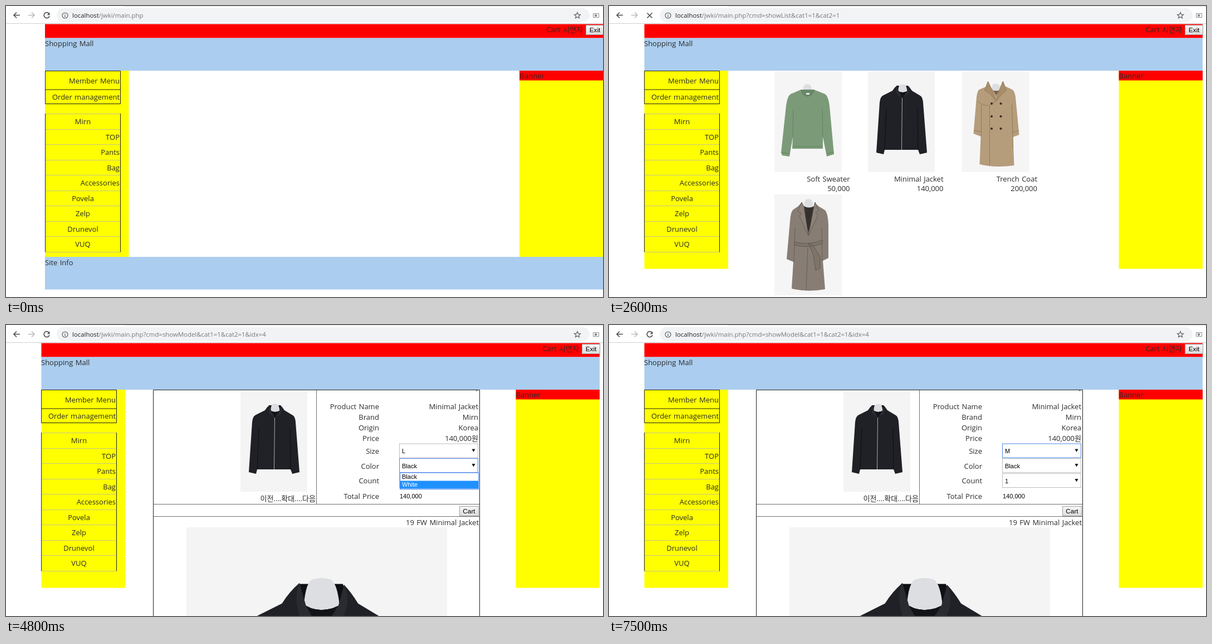
Write an HTML page that moves like this. It is 1072x522 px and loops after 8 s.

```html
<!DOCTYPE html>
<html lang="en">
<head>
<meta charset="utf-8">
<title>Shopping Mall</title>
<style>
html, body { margin: 0; width: 100%; height: 100%; overflow: hidden; background: #fff; }
svg { display: block; width: 1072px; height: 522px; }
text { font: 13px "Open Sans", "Noto Sans CJK KR", "Noto Sans CJK", sans-serif; word-spacing: 1px; fill: #2b2b2b; }
.ui { font: 11px "Liberation Sans", Arial, sans-serif; word-spacing: 0; fill: #000; }
.btn { font-size: 11.8px; }
.url { font-size: 11.4px; word-spacing: 0; fill: #75787c; }
</style>
</head>
<body>
<svg viewBox="0 0 1072 522">
  <defs>
    <linearGradient id="face" x2="0" y2="1"><stop stop-color="#f8f8f8"/><stop offset="1" stop-color="#dcdcdc"/></linearGradient>
    <pattern id="tweed" width="3" height="3" patternUnits="userSpaceOnUse">
      <rect width="3" height="3" fill="#91877c"/><path d="M0 0H1.5V1.5H3V3H1.5V1.5H0Z" fill="#7d746b"/>
    </pattern>
    <g id="neck"><path d="M54 36Q55 25 58 24Q62 22.500 66.500 24Q69.500 26 70.500 36Q62 40 54 36Z" fill="#dcdee1"/></g>
    <g id="jacket">
      <rect width="120" height="181" fill="#f5f4f5"/>
      <path d="M52 26L72 26L76 36L62 50L48 36Z" fill="#0e0f12"/>
      <use href="#neck"/>
      <path d="M52 25.600Q47 30 44 35L27 43.500Q22 46 21 56L15 146L28 149L30 141H90L93 149L106 146L99 56Q98 46 94 44L79 35Q76 30 72.600 26.400L70 36Q62 40 55 36Z" fill="#1f2126"/>
      <path d="M55 36Q62 40 70 36L62 48Z" fill="#121317"/>
      <path d="M52 25.600Q49 33 52.500 42L61 47L55 36ZM72.600 26.400Q76 33 72 42L63 47L70 36Z" fill="#292b30"/>
      <path d="M30 141L33 68M90 141L89 68" stroke="#0c0d10" fill="none"/>
      <path d="M61.500 48L60.500 141" stroke="#b9bbbf" stroke-width=".9"/>
    </g>
    <g id="sweater">
      <rect width="121" height="181" fill="#f6f5f6"/>
      <use href="#neck" x="-3"/>
      <path d="M48 33L29 41Q23 45 21 62L12 146L14 151L27 153L33 118L32 139H87L87 118L94 153L107 149L99 62Q97 45 91 41L71 33Q60 40 48 33Z" fill="#7b9b78"/>
      <path d="M48 33Q50 44 60 45Q69 44 71 33" fill="#69886a" stroke="#5d7b5e"/>
      <path d="M33 118L34 68M87 118L86 68M33 135H86M13 146L27 148M94 148L107 145" fill="none" stroke="#64835f"/>
      <path d="M57 39H63V42H57Z" fill="#e5e9e2"/>
    </g>
    <g id="trench">
      <rect width="121" height="181" fill="#f6f5f6"/>
      <use href="#neck" x="-1" y="-1"/>
      <path d="M47 18L43 28L31 33Q27 36 26 52L21 112L34 117L32 167Q60 174 94 169L92 118L103 114L97 52Q96 36 91 33L78 27L73 18L70 30L62 44L53 30Z" fill="#b59c7b"/>
      <path d="M53 30L62 44L70 30L66 35H57Z" fill="#7c6549"/>
      <path d="M47 18L41 34L51 41L61 53L52 29ZM74 18L80 34L71 42L62 53L69 29Z" fill="#a88e6b" stroke="#896f4f" stroke-width=".7"/>
      <path d="M62 53L50 62V169M35 60V117M90 60L92 137M22 106L35 109M91 110L102 106M28 54Q40 63 49 61" fill="none" stroke="#8f7654" stroke-width=".9"/>
      <path d="M53.500 58h.1M70 58h.1M53.500 81h.1M70 81h.1M53.500 103h.1M70 103h.1" stroke="#3c2e20" stroke-width="4" stroke-linecap="round"/>
    </g>
    <g id="coat">
      <rect width="121" height="181" fill="#f6f5f6"/>
      <use href="#neck" x="-1" y="-15"/>
      <path d="M49 14L43 21L34 27Q29 31 28 48L22 116L34 121L31 169Q60 176 91 170L87 119L97 114L97 55Q96 30 89 27L79 21L72 14L71 22Q62 26 53 22Z" fill="url(#tweed)"/>
      <path d="M53 21Q62 26 71 21L70 42L61 68L55 45Z" fill="#34302d"/>
      <path d="M49 14L42 30L49 34L45 39L61 74L53 22ZM73 14L79 29L74 33L78 38L61 74L70 27Z" fill="#8d8278" stroke="#5e564e" stroke-width=".8"/>
      <path d="M36 85Q60 92 86 82V88Q62 97 36 91ZM61 88L69 91L82 112L82 132L74 136L70 108Z" fill="#7e746a" stroke="#595149" stroke-width=".8"/>
      <path d="M35 121L37 60M86 119L85 60M60 95L57 172" fill="none" stroke="#675e55"/>
    </g>
  </defs>
  <g id="stage"></g>
</svg>
<script>
const LOOP = 8000, BLUE = '#4a86e8';
const stage = document.getElementById('stage');

const rect = (x, y, w, h, fill, extra = '') =>
  `<rect x="${x}" y="${y}" width="${w}" height="${h}" fill="${fill}" ${extra}/>`;
const text = (x, y, s, anchor = 'end', cls = '', extra = '') =>
  `<text x="${x}" y="${y}" text-anchor="${anchor}" class="${cls}" ${extra}>${s}</text>`;
const line = (d, color = '#222', extra = '') =>
  `<path d="${d}" fill="none" stroke="${color}" ${extra}/>`;
const image = (id, x, y, scale = 1) =>
  `<use href="#${id}" transform="translate(${x} ${y}) scale(${scale})"/>`;
const shift = (dx, s) => `<g transform="translate(${dx})">${s}</g>`;
const button = (x, y, w, label) =>
  rect(x + .5, y + .5, w, 17, 'url(#face)', 'stroke="#a3a3a3"') +
  text(x + w / 2 + .5, y + 13, label, 'middle', 'ui btn');

function toolbar(query, loading) {
  const reload = line('M77.200 13.600A5 5 0 1 0 78 18', '#4a4d51', 'stroke-width="1.600"') +
    '<path d="M78.500 11.500V16.300H73.700Z" fill="#4a4d51"/>';
  const stop = line('M68.500 12.500L77.500 21.500M77.500 12.500L68.500 21.500', '#4a4d51', 'stroke-width="1.600"');
  return rect(0, 0, 1072, 32, '#fff') + rect(213, 0, 859, 1, '#dee1e6') +
    rect(91, 4, 957, 25, '#f1f3f4', 'rx="12.500"') +
    line('M0 31.500H1072', '#cfd1d4') +
    line('M25 16.500H14M19 11.500L14 16.500L19 21.500', '#4a4d51', 'stroke-width="1.600"') +
    line('M40 16.500H51M46 11.500L51 16.500L46 21.500', '#b9bbbe', 'stroke-width="1.600"') +
    (loading ? stop : reload) +
    '<circle cx="106" cy="17" r="5" fill="none" stroke="#5f6368" stroke-width="1.200"/>' +
    line('M106 13.800V15M106 16.200V20', '#5f6368', 'stroke-width="1.300"') +
    text(119, 21, `<tspan fill="#202124">localhost</tspan>/jwki/main.php${query}`, 'start', 'url') +
    line('M1026 11.500L1027.600 15.200L1031.500 15.500L1028.500 18L1029.500 21.800L1026 19.700L1022.500 21.800L1023.500 18L1020.500 15.500L1024.400 15.200Z', '#5f6368', 'stroke-width="1.200"') +
    line('M1054.500 13.500H1064.500V20.500H1054.500Z', '#8a8d91') +
    rect(1057, 15, 4, 4, '#8a8d91');
}

const brands = ['Mirn', 'TOP', 'Pants', 'Bag', 'Accessories', 'Povela', 'Zelp', 'Drunevol', 'VUQ'];

function layout(tall) {
  const bottom = tall ? 471.5 : 450;
  const blocks = rect(70, 32.5, 1002.5, 25, '#f00') + rect(70, 57.5, 1002.5, 58.5, '#abcdef') +
    rect(70, 116, 150.500, bottom - 116, '#ff0') + rect(922, 116, 150.5, bottom - 116, '#ff0') +
    rect(922, 116, 150.5, 17.5, '#f00') +
    (tall ? '' : rect(70, 450, 1002.5, 58.5, '#abcdef'));
  const rowY = i => Math.round(193 + i * 27.55) + .5;
  const menu = brands.map((name, i) => {
    const side = i > 0 && i < 5;
    return text(side ? 204 : 138, rowY(i) + 18.5, name, side ? 'end' : 'middle');
  }).join('');
  const rules = Array.from({ length: 10 }, (_, i) => `M71 ${rowY(i)}H205`).join('');
  const labels = line('M70.500 116.500H205.500V175.500H70.500ZM70.500 150H205.500') +
    line(rules, '#c6c68c') + line('M70.500 193V441.500M205.500 193V441.500') + menu +
    text(204, 138.500, 'Member Menu') + text(204, 168, 'Order management') +
    text(70, 72, 'Shopping Mall', 'start') + text(922.5, 130, 'Banner', 'start') +
    text(1036, 46.5, 'Cart 시연자') + button(1041, 34, 32, 'Exit') +
    (tall ? '' : text(70, 464.5, 'Site Info', 'start'));
  return shift(tall ? -6.5 : 0, blocks) + shift(tall ? -7 : 0, labels);
}

function products() {
  const item = (id, x, name, price) => image(id, x, 117) +
    text(x + 135.5, 315, name) + text(x + 135.5, 332, price);
  return item('sweater', 297, 'Soft Sweater', '50,000') +
    item('jacket', 465, 'Minimal Jacket', '140,000') +
    item('trench', 633.5, 'Trench Coat', '200,000') + image('coat', 297, 338);
}

function select(y, value, focused) {
  return rect(713.5, y, 141, 25, '#fff', `stroke="${focused ? BLUE : '#bdbdbd'}"`) +
    text(718, y + 17, value, 'start', 'ui') +
    `<path d="M843.500 ${y + 9.500}H849.500L846.500 ${y + 15}Z" fill="#111"/>`;
}

function options(y, names, hover) {
  return rect(714.5, y, 141, names.length * 14 + 1.5, '#fff', `stroke="${BLUE}"`) +
    names.map((name, i) => {
      const top = y + .5 + i * 14, on = i === hover;
      return (on ? rect(715, top, 140, 14, '#1e90ff') : '') +
        text(718, top + 10.5, name, 'start', 'ui', on ? 'style="fill:#fff"' : '');
    }).join('');
}

function detail({ loaded, size = 'L', focus, list, hover }) {
  const bottom = loaded ? 530 : 381.5;
  const rows = [
    [150.5, 'Product Name', 'Minimal Jacket'], [169.5, 'Brand', 'Mirn'],
    [188.5, 'Origin', 'Korea'], [207.5, 'Price', '140,000원'],
    [231, 'Size'], [257.5, 'Color'], [284, 'Count'], [311.5, 'Total Price']
  ];
  const body = image('jacket', 428, 118) + (loaded ? image('jacket', 331, 363, 3.9) : '') +
    line('M564.500 116V321.500M271.500 321.500H857M271.500 343.500H857', '#707070') +
    line(`M271.500 116.500H857.500V${bottom}H271.500Z`) +
    text(563, 316, '이전....확대....다음') + text(856, 127, '`') +
    rows.map(([y, label, value]) => text(677, y, label) + (value ? text(855, y, value) : '')).join('') +
    select(213, size, focus === 'size') + select(239.5, 'Black', focus === 'color') +
    select(266.5, '1') + text(714, 311, '140,000', 'start', 'ui') +
    button(821, 325, 34, 'Cart') + text(856, 359, '19 FW Minimal Jacket') +
    (list && focus === 'color' ? options(265, ['Black', 'White'], hover) : '') +
    (list && focus === 'size' ? options(238.5, ['L', 'M', 'S'], hover) : '');
  return shift(loaded ? -7 : 0, body);
}

// Each step changes only the listed properties.
const steps = [
  [0, { page: 'home', query: '' }],
  [1200, { loading: true }],
  [1500, { page: 'list', query: '?cmd=showList&amp;cat1=1&amp;cat2=1', loading: false }],
  [2600, { loading: true }],
  [2700, { page: 'detail', query: '?cmd=showModel&amp;cat1=1&amp;cat2=1&amp;idx=4' }],
  [2800, { loaded: true, loading: false }],
  [4100, { focus: 'color' }],
  [4300, { list: true, hover: 0 }],
  [4800, { hover: 1 }],
  [5100, { hover: 0 }],
  [5800, { focus: 'size', list: false }],
  [6000, { list: true }],
  [6600, { hover: 1 }],
  [6900, { hover: 0 }],
  [7100, { hover: 1 }],
  [7500, { size: 'M', list: false }]
];

function render(s) {
  const tall = s.page === 'list' || s.loaded;
  return layout(tall) + (s.page === 'list' ? products() : '') +
    (s.page === 'detail' ? detail(s) : '') + toolbar(s.query, s.loading);
}

let shown = 0;
function frame(now) {
  const t = now % LOOP;
  const past = steps.filter(([at]) => at <= t);
  if (past.length !== shown) {
    shown = past.length;
    stage.innerHTML = render(Object.assign({}, ...past.map(step => step[1])));
  }
  requestAnimationFrame(frame);
}
frame(performance.now());
</script>
</body>
</html>
```
